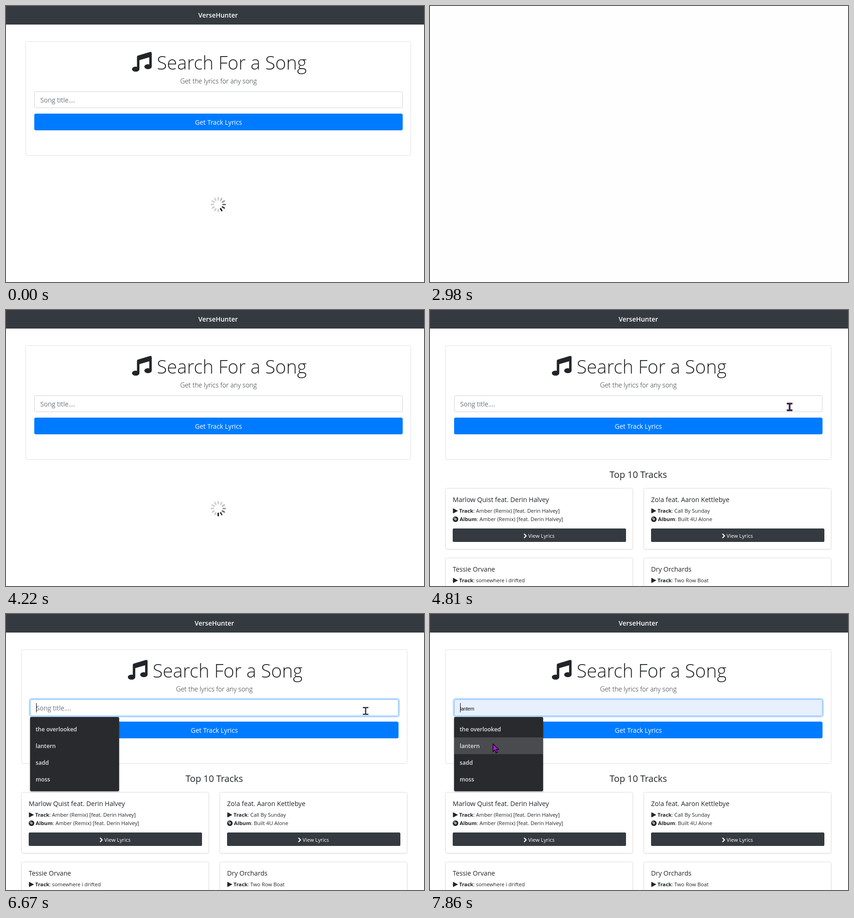
An HTML page that plays this animation: 902x595 px, repeating every 8000 ms.

```html
<!DOCTYPE html>
<html lang="en">
<head>
<meta charset="utf-8">
<title>Lyrics search</title>
<style>
  html, body { margin: 0; width: 100%; height: 100%; overflow: hidden; background: #fff; }
  svg { display: block; width: 902px; height: 595px; font-family: "Open Sans", "Noto Sans", sans-serif; fill: #212529; }
  text { white-space: pre; }
  .mid { text-anchor: middle; }
  .light { font-weight: 300; }
  .medium { font-weight: 500; }
  .body { font-size: 11.25px; }
  .lg { font-size: 14px; }
  .white { fill: #fff; }
  .box { fill: #fff; stroke: #dfdfdf; }
  .card { filter: drop-shadow(0 1.5px 1.5px rgba(0, 0, 0, .075)); }
  #panel { width: 832px; }
  .loading #panel { width: 831px; }
  .loading #main { transform: translateX(9px); }
  .loading #brand { transform: translateX(8px); }
  #field { fill: #fff; stroke: #ced4da; }
  .focused #field { stroke: #80bdff; }
  .filled #field { fill: #e8f0fe; }
  #ring { fill: none; stroke: #007bff; stroke-width: 3; }
  #menu text { font-size: 12.3px; font-weight: 600; fill: #e3e3e5; }
  #menu .sheet { fill: #292a2d; filter: drop-shadow(0 1px 1.5px rgba(0, 0, 0, .45)); }
  #beam { fill: none; }
  #beam .rim { stroke: #000; stroke-width: 3.4; }
  #beam .core { stroke: #a512dd; stroke-width: 1.2; }
  .focused #beam .rim { stroke: #24253f; stroke-width: 2.6; }
  .focused #beam .core { stroke: #45466a; stroke-width: .8; }
</style>
</head>
<body>
<svg id="stage" viewBox="0 0 902 595">
  <g id="page">
    <rect width="902" height="40" fill="#343a40"/>
    <text id="brand" class="mid lg white" x="449.7" y="25" font-weight="600">VerseHunter</text>
    <g id="main">
      <rect id="panel" class="box" x="33.5" y="76.5" height="246" rx="3"/>
      <path transform="translate(263 99) scale(.083)" d="M470 1.5L150 96A32 32 0 0 0 128 126.500V388A139 139 0 0 0 96 384c-53 0-96 28.700-96 64s43 64 96 64 96-28.700 96-64V214l256-75v185a138 138 0 0 0-32-4c-53 0-96 28.700-96 64s43 64 96 64 96-28.700 96-64V32A32 32 0 0 0 470 1.500z"/>
      <text class="light" x="316.500" y="137" font-size="40">Search For a Song</text>
      <text class="mid light" x="449.500" y="167" font-size="14.200">Get the lyrics for any song</text>
      <rect id="ring" x="50.500" y="182.500" width="798" height="39" rx="5"/>
      <rect id="field" x="52.500" y="184.500" width="794" height="35" rx="3.500"/>
      <text id="hint" class="lg" x="65" y="208" fill="#6c757d">Song title....</text>
      <text id="value" x="65" y="208" font-size="10" fill="#000" font-family="Liberation Sans, Arial, sans-serif">lantern</text>
      <rect id="caret" x="65" y="192" width="1" height="20" fill="#000"/>
      <rect x="52" y="232" width="795" height="36" rx="3.500" fill="#007bff"/>
      <text class="mid lg white" x="449.500" y="256">Get Track Lyrics</text>
    </g>
    <g id="spinner" transform="translate(458 428)" stroke-width="3" stroke-linecap="round"></g>
    <g id="tracks">
      <text class="mid medium" x="449.500" y="362" font-size="19.700">Top 10 Tracks</text>
    </g>
    <g id="menu">
      <rect class="sheet" x="52" y="222" width="192" height="160" rx="3"/>
      <rect id="hover" x="52" y="266" width="192" height="36" fill="#4a4b4e"/>
    </g>
    <path id="arrow" d="M0 0V16.500L4 13 7 19.500 10 18 7 11.800H12z" fill="#b313ea" stroke="#000" stroke-width="1.300"/>
    <g id="beam">
      <path class="rim" d="M-6 -7.300H6M-6 7.300H6M0 -8V8"/>
      <path class="core" d="M-5 -7.300H5M-5 7.300H5M0 -7V7"/>
    </g>
  </g>
  <rect id="blank" width="902" height="595" fill="#fefefe"/>
</svg>
<script>
const LOOP = 8000;
const $ = id => document.getElementById(id);
const stage = $('stage');
const show = (id, on) => $(id).setAttribute('visibility', on ? 'visible' : 'hidden');
const add = (id, markup) => $(id).insertAdjacentHTML('beforeend', markup);

const line = (y, label, x, value) =>
  `<text class="body" x="${x}" y="${y}"><tspan font-weight="700">${label}</tspan>: ${value}</text>`;

const card = (x, y, artist, track, album) => `
  <g transform="translate(${x} ${y})">
    <rect class="box card" x=".5" y=".5" width="404" height="131" rx="3"/>
    <text class="medium" x="16" y="30" font-size="14.1">${artist}</text>
    <path d="M17 44L26.500 49 17 54z" stroke="#212529" stroke-linejoin="round"/>
    ${line(53, 'Track', 30, track)}
    <circle cx="22" cy="67" r="6"/>
    <circle cx="22" cy="67" r="1.7" fill="none" stroke="#fff" stroke-width="1.2"/>
    <path d="M18 66.500A4 4 0 0 1 21.500 63" fill="none" stroke="#fff" stroke-width=".9"/>
    ${line(71, 'Album', 31, album)}
    <rect x="16" y="87" width="374" height="29" rx="2.500" fill="#343a40"/>
    <path d="M170 98.500L174.500 103 170 107.500" fill="none" stroke="#fff" stroke-width="2.2"/>
    <text class="body white" x="179" y="107">View Lyrics</text>
  </g>`;

[
  ['Marlow Quist feat. Derin Halvey', 'Amber (Remix) [feat. Derin Halvey]', 'Amber (Remix) [feat. Derin Halvey]'],
  ['Zo!a feat. Aaron Kettlebye', 'Call By Sunday', 'Built 4U Alone'],
  ['Tessie Orvane', 'somewhere i drifted', 'somewhere i drifted'],
  ['Dry Orchards', 'Two Row Boat', 'Two Row Boat']
].forEach((c, i) => add('tracks', card(33 + 428 * (i % 2), 384 + 150 * (i >> 1), ...c)));

['the overlooked', 'lantern', 'sadd', 'moss'].forEach((word, i) =>
  add('menu', `<text x="64" y="${253 + 36 * i}">${word}</text>`));

for (let i = 0; i < 12; i++)
  add('spinner', `<line y1="-10.300" y2="-15.200" transform="rotate(${30 * i})"/>`);
const spokes = [...$('spinner').children];
const shades = ['#111', '#3a3a3e', '#68686e', '#96969c', '#b8b8bc'];

// Index of the darkest spoke, clockwise from the top
function spinnerHead(t) {
  if (t < 670) return t < 50 ? 5 : 6 + Math.floor((t - 50) / 77.5);
  if (t < 3980) return 3 + Math.floor((t - 3160) / 70);
  return 15 + Math.floor((t - 3980) / 76);
}

const lerp = (a, b, p) => a + (b - a) * p;
const ease = p => p * p * (3 - 2 * p);

// The pointer is sampled in steps, like a screen recorder does
function pointer(t) {
  if (t < 4436) return null;
  if (t < 7420) {
    const p = 1 - (1 - Math.min(4, Math.floor((t - 4436) / 76)) / 4) ** 2;
    return [lerp(882, 776, p), lerp(222, 209, p)];
  }
  const p = ease(Math.min(8, 1 + Math.floor((t - 7420) / 62.8)) / 8);
  return [lerp(776, 136, p), lerp(209, 280, p)];
}

function draw(t) {
  const blank = t >= 2980 && t < 3160;
  const loading = t < 670 || (t >= 3160 && t < 4810);
  const focused = t >= 5620;
  const pos = pointer(t);
  const filled = t >= 7420 && pos[0] < 244;
  const inField = pos && pos[0] < 856 && pos[1] < 220;

  stage.classList.toggle('loading', loading);
  stage.classList.toggle('focused', focused);
  stage.classList.toggle('filled', filled);
  show('blank', blank);
  show('spinner', loading);
  show('tracks', !loading);
  show('menu', focused);
  show('hover', filled);
  show('hint', !filled);
  show('value', filled);
  show('caret', focused && (t < 5670 || Math.floor((t - 5670) / 500) % 2 === 0));
  $('ring').setAttribute('opacity', focused ? (t < 5670 ? .13 : .25) : 0);
  show('arrow', pos && !inField);
  show('beam', inField);
  if (pos) for (const id of ['arrow', 'beam'])
    $(id).setAttribute('transform', `translate(${pos.map(Math.round)})`);

  if (loading) {
    const head = spinnerHead(t);
    spokes.forEach((s, i) => s.setAttribute('stroke', shades[(head - i + 24) % 12] || '#cdcdcf'));
  }
}

function tick() {
  draw(performance.now() % LOOP);
  requestAnimationFrame(tick);
}
tick();
</script>
</body>
</html>
```
